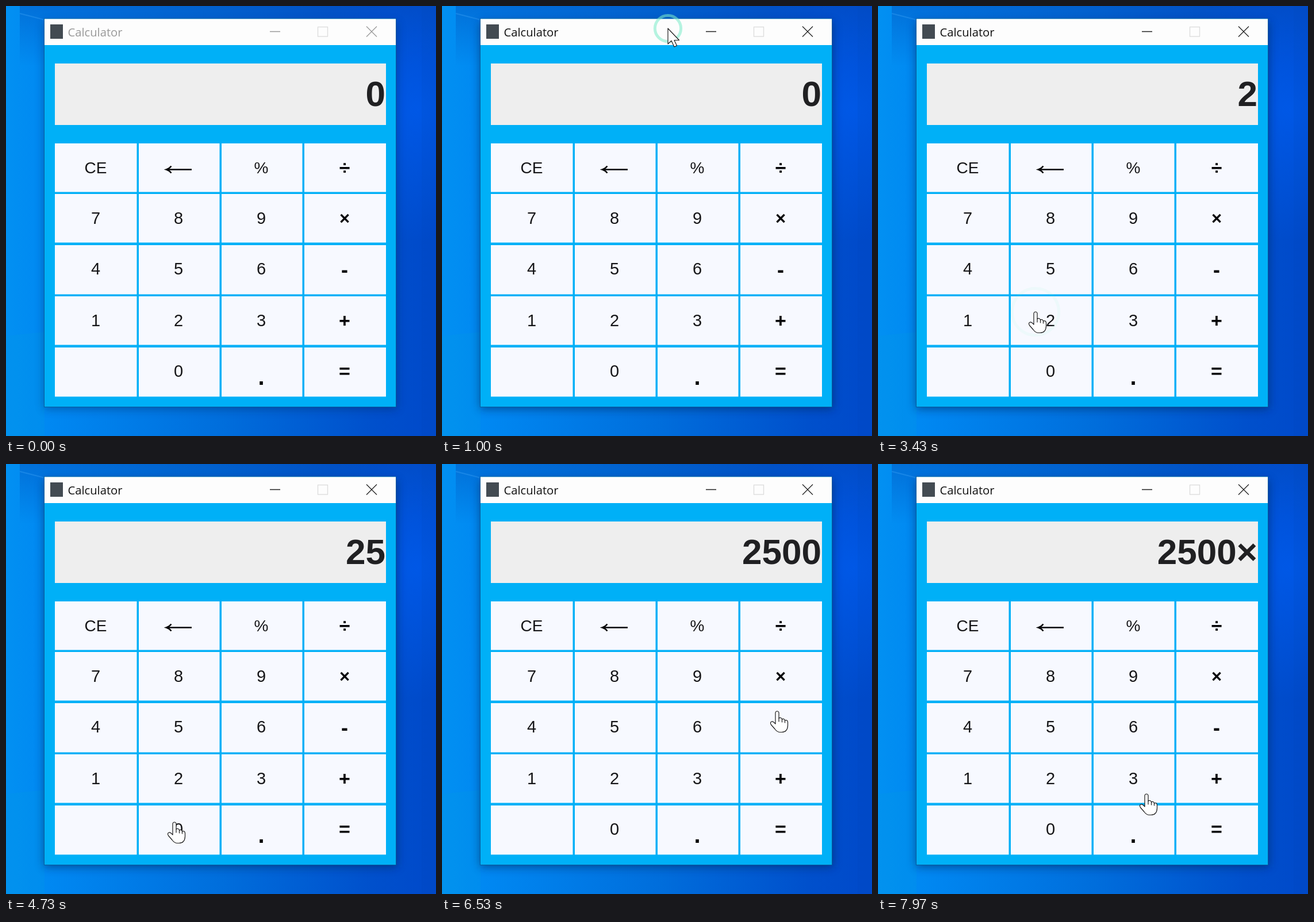
Animation, 748 px wide and 748 px high, one loop 8000 ms. Source, as an HTML page:

```html
<!DOCTYPE html>
<html lang="en">
<head>
<meta charset="utf-8">
<title>Calculator</title>
<style>
  html, body { margin: 0; width: 100%; height: 100%; overflow: hidden; background: #0068dc; }
  svg { display: block; width: 100%; height: 100%; }
  text { font-family: "Liberation Sans", Arial, sans-serif; }
  .key { fill: #f7f9ff; }
  .label { fill: #161618; text-anchor: middle; }
  .op { fill: #060608; font-weight: bold; }
  #display { fill: #202022; font-size: 62px; font-weight: bold; text-anchor: end; }
  #caption { font-family: "Open Sans", "Noto Sans", sans-serif; font-size: 20.2px; fill: #111; }
  #controls { fill: none; stroke: #222; stroke-width: 1.3; }
  .inactive #caption { fill: #999; }
  .inactive #controls { stroke: #999; }
  .inactive #shadow { opacity: .4; }
  .cursor { fill: #fff; stroke: #1a1a1a; stroke-width: 1.2; stroke-linejoin: round; stroke-linecap: round; }
</style>
</head>
<body>
<svg viewBox="0 0 748 748">
  <defs>
    <linearGradient id="sky">
      <stop offset="0" stop-color="#0290f2"/>
      <stop offset=".1" stop-color="#0088f2"/>
      <stop offset=".5" stop-color="#006edc"/>
      <stop offset=".85" stop-color="#0050cc"/>
      <stop offset="1" stop-color="#0049ca"/>
    </linearGradient>
    <linearGradient id="dusk" x2="0" y2="1">
      <stop offset="0" stop-color="#0348b4" stop-opacity=".4"/>
      <stop offset=".14" stop-color="#0348b4" stop-opacity="0"/>
    </linearGradient>
    <radialGradient id="glow" gradientUnits="userSpaceOnUse" cx="715" cy="180" r="230">
      <stop offset="0" stop-color="#0060f8" stop-opacity=".6"/>
      <stop offset="1" stop-color="#0060f8" stop-opacity="0"/>
    </radialGradient>
    <filter id="blur" x="-10%" y="-10%" width="120%" height="120%"><feGaussianBlur stdDeviation="8"/></filter>
    <filter id="soften" filterUnits="userSpaceOnUse" x="67" y="69" width="611" height="628"
      color-interpolation-filters="sRGB"><feGaussianBlur stdDeviation=".7"/></filter>
  </defs>

  <rect width="748" height="748" fill="url(#sky)"/>
  <rect x="24" width="724" height="748" fill="url(#dusk)"/>
  <rect width="748" height="748" fill="url(#glow)"/>
  <path d="M0 574L67 567V748H0Z" fill="#0096e0" opacity=".25"/>
  <path d="M24 13L67 24" stroke="#39a0f4" stroke-width="2" opacity=".4"/>
  <path d="M723 0H748V748H723Z" fill="#004ab0" opacity=".13"/>

  <g id="window">
    <rect id="shadow" x="66" y="28" width="614" height="673" fill="#00234f" opacity=".55" filter="url(#blur)"/>
    <rect x="66.5" y="22" width="612" height="675.5" fill="#00b0f7" stroke="#0a5c9c"/>
    <rect x="67" y="22.5" width="611" height="45.5" fill="#fdfdfd"/>
    <rect x="77" y="32" width="22" height="25" fill="#434b52"/>
    <text id="caption" x="107.5" y="53">Calculator</text>
    <g id="controls">
      <path d="M459 44.5H477M627 35.500L645 53.500M645 35.500L627 53.500"/>
      <rect x="542.5" y="36.500" width="17" height="16.500" stroke="#dcdcdc"/>
    </g>
    <g filter="url(#soften)">
      <rect x="85" y="100" width="576" height="107" fill="#eee"/>
      <text id="display" x="660" y="174"></text>
      <g id="keys"></g>
      <path d="M280 284.500H323M287.500 278.500Q284 283 279 284.500Q284 286 287.500 290.500" fill="none" stroke="#060608" stroke-width="2.500"/>
    </g>
  </g>

  <circle id="ripple" fill="none" stroke="#7eeccb"/>
  <g id="pointer">
    <path id="arrow" class="cursor" d="M0 0V27L6 21.500L11 32L15.500 30L11 20.500H19.500Z"/>
    <g id="hand" class="cursor">
      <path d="M-3 3a3 3 0 0 1 6 0V12Q7 10 8.500 14Q12 12 13.500 16Q18 14.500 18.500 19V25Q18 36.500 8 36.500H5Q0 36.500 -4 31L-10.500 23.500Q-13 19.500 -9.500 18Q-7 17.500 -3 22Z"/>
      <path d="M3 12V18M8.500 14V19M13.500 16V20" fill="none"/>
    </g>
  </g>
</svg>

<script>
const LOOP = 8000, RIPPLE = 460;
const $ = id => document.getElementById(id);

function add(parent, tag, attrs, content = "") {
  const node = document.createElementNS("http://www.w3.org/2000/svg", tag);
  for (const name in attrs) node.setAttribute(name, attrs[name]);
  node.textContent = content;
  parent.append(node);
}

const lefts = [85, 231, 375, 519], rights = [227.5, 371.5, 515.5, 661];
const tops = [239, 327, 416, 505, 594], bottoms = [323.5, 411.5, 501.5, 589.5, 679.5];
const centers = [156, 300, 444, 589], baselines = [291, 379, 467, 557, 645];
const rows = [["CE", "", "%", "÷"], [..."789×"], [..."456-"], [..."123+"], ["", "0", ".", "="]];
// Operator type: font size and drop below the row's baseline
const operators = { "÷": [34, 2], "×": [31, 0.5], "-": [36, 4], "+": [34, 2], "=": [34, 2], ".": [40, 14] };

rows.forEach((row, r) => row.forEach((label, c) => {
  add($("keys"), "rect", { class: "key", x: lefts[c], y: tops[r],
    width: rights[c] - lefts[c], height: bottoms[r] - tops[r] });
  const [size, drop] = operators[label] || [r ? 29 : 28, 0];
  add($("keys"), "text", { class: label in operators ? "label op" : "label",
    x: centers[c], y: baselines[r] + drop, "font-size": size }, label);
}));

// Pointer stops: time, x, y
const stops = [
  [150, 770, 60], [720, 393, 39], [1250, 393, 39], [2150, 272, 531], [2900, 272, 531],
  [3030, 274, 532], [3500, 274, 532], [3820, 296, 451], [4250, 296, 451], [4680, 293, 623],
  [5800, 293, 623], [6480, 583, 430], [6560, 583, 430], [6900, 584, 364],
  [7360, 584, 364], [7940, 467, 574], [8000, 467, 574]
];
// Clicks: time and the display that follows
const clicks = [[800, "0"], [3010, "2"], [3960, "25"], [5000, "250"], [5480, "2500"], [7080, "2500×"]];

function pointerAt(t) {
  const next = stops.findIndex(s => s[0] > t);
  if (next < 1) return stops[0].slice(1);
  const [t0, x0, y0] = stops[next - 1], [t1, x1, y1] = stops[next];
  const p = (t - t0) / (t1 - t0), e = p * p * (3 - 2 * p);
  return [x0 + (x1 - x0) * e, y0 + (y1 - y0) * e];
}

function draw(now) {
  const t = now % LOOP;
  const [x, y] = pointerAt(t);
  const overKeys = x > 84 && x < 661 && y > 238 && y < 680;
  $("pointer").setAttribute("transform", `translate(${x} ${y})`);
  $("hand").style.display = overKeys ? "" : "none";
  $("arrow").style.display = overKeys ? "none" : "";

  const last = clicks.filter(c => c[0] <= t).pop();
  $("window").classList.toggle("inactive", !last);
  $("display").textContent = last ? last[1] : "0";

  const age = last ? (t - last[0]) / RIPPLE : 1;
  const ripple = $("ripple");
  ripple.style.display = age < 1 ? "" : "none";
  if (age < 1) {
    const [cx, cy] = pointerAt(last[0]);
    ripple.setAttribute("cx", cx);
    ripple.setAttribute("cy", cy);
    ripple.setAttribute("r", 6 + 38 * age);
    ripple.setAttribute("stroke-width", 5);
    ripple.setAttribute("opacity", 1 - age);
  }
  requestAnimationFrame(draw);
}
draw(performance.now());
</script>
</body>
</html>
```
